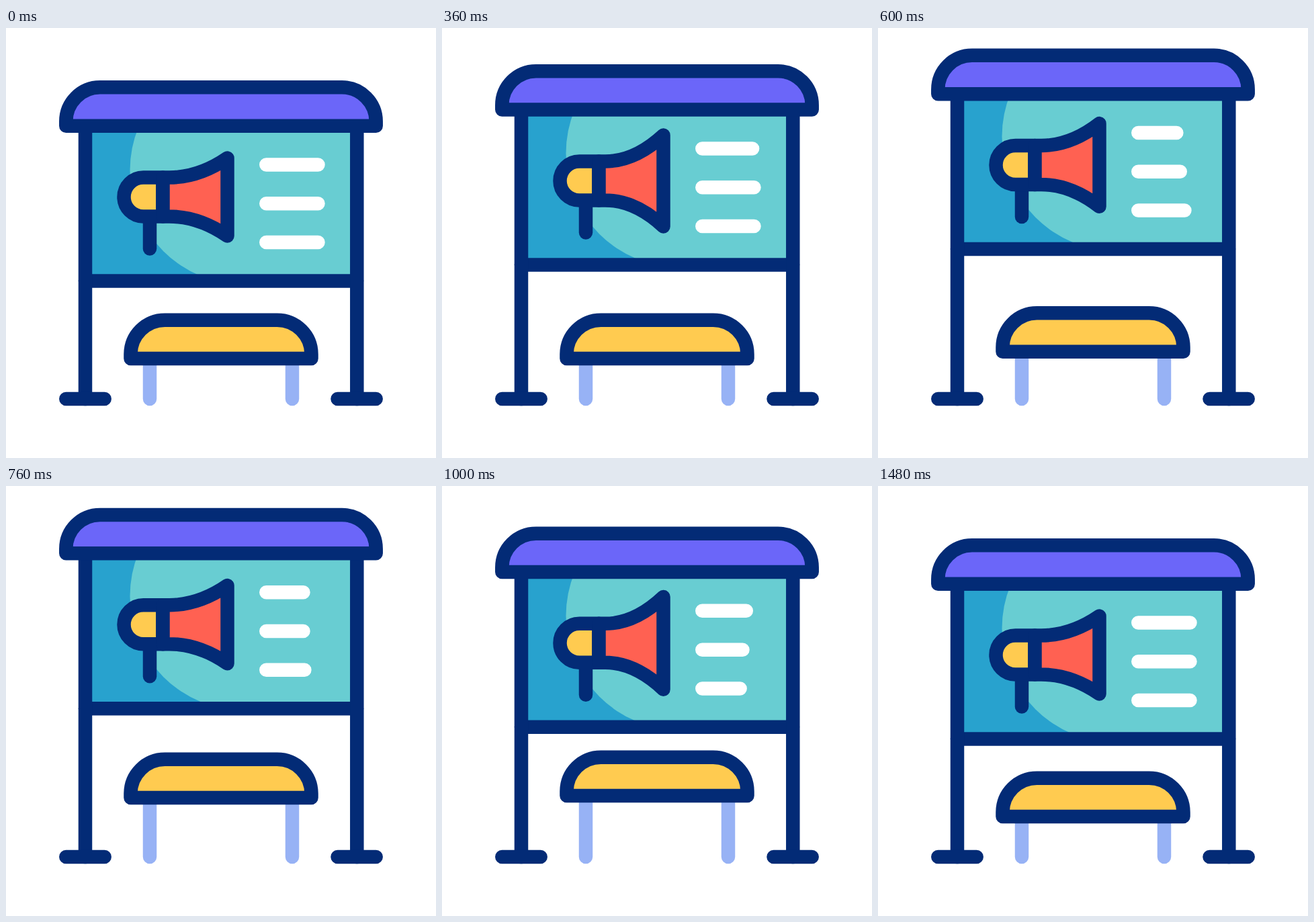
Write an HTML page that moves like this. It is 640 px wide and 640 px high and loops after 1640 ms.

```html
<!DOCTYPE html>
<html lang="en">
<head>
<meta charset="utf-8">
<title>Bus stop billboard</title>
<style>
  html, body { margin: 0; width: 100%; height: 100%; overflow: hidden; background: #fff; }
  body > svg { display: block; width: 100%; height: 100%; }
  .line { stroke: #032b76; stroke-width: 20.5; stroke-linecap: round; stroke-linejoin: round; }
</style>
</head>
<body>
<svg viewBox="0 0 640 640">
  <g class="line" fill="none">
    <path id="legs" style="stroke: #97b2f5"/>
    <path id="bench" fill="#ffcb50" d="M185.5 492V485.5A51 51 0 0 1 236.5 434.7H403.5A51 51 0 0 1 454.5 485.5V492Z"/>
    <g id="shelter">
      <svg x="118" y="146" width="404" height="230" viewBox="118 146 404 230" stroke="none">
        <path fill="#28a2ce" d="M118 146H522V376H118Z"/>
        <path id="glow" fill="#68cdd2" d="M600 42H354.5A170 170 0 0 0 354.5 382H600Z"/>
      </svg>
      <path d="M118 376.5H522"/>
      <path d="M214 281V328.5"/>
      <path fill="#ffcb50" d="M233.5 222.5H204.5A29 29 0 0 0 204.5 280.5H233.5Z"/>
      <path id="bell" fill="#ff6152"/>
      <path id="bars" style="stroke: #fff"/>
    </g>
    <path id="posts"/>
    <path id="roof" fill="#6b66f9" d="M89.3 145.7V139A50.7 50.7 0 0 1 140 88.3H500A50.7 50.7 0 0 1 550.7 139V145.7Z"/>
    <path d="M89.3 552H146.7M493.5 552H550.7"/>
  </g>
</svg>
<script>
const LOOP = 1640, STEP = 40;
const el = id => document.getElementById(id);
const shape = (id, d) => el(id).setAttribute("d", d);
const shift = (id, y) => el(id).setAttribute("transform", `translate(0 ${y})`);

const ease = (t, from, to) => {
  const x = Math.min(1, Math.max(0, (t - from) / (to - from)));
  return x * x * (3 - 2 * x);
};
// Rises from a to b, holds, then falls from c to d
const pulse = (t, a, b, c, d) => ease(t, a, b) - ease(t, c, d);

function draw(t) {
  const lift = -48.2 * pulse(t, 80, 640, 680, 1222);
  const hop = -32 * pulse(t, 446, 851, 945, 1480);
  const flare = 11 * (pulse(t, 100, 420, 420, 720) + pulse(t, 740, 1020, 1020, 1290));

  shift("shelter", lift);
  shift("roof", lift);
  shift("glow", lift * 0.06);
  shift("bench", hop);
  shape("posts", `M118 ${146 + lift}V552M522.3 ${146 + lift}V552`);
  shape("legs", `M214 ${492 + hop}V552M426 ${492 + hop}V552`);

  const top = 193.5 - flare, bottom = 309.5 + flare, bend = flare * 0.4;
  shape("bell", `M233.5 222.5H243C275 222.5 304 ${211 - bend} 329.5 ${top}V${bottom}` +
    `C304 ${292 + bend} 275 280.5 243 280.5H233.5Z`);

  shape("bars", [0, 1, 2].map(i => {
    const shrink = 22 * pulse(t - i * 80, 280, 670, 775, 1245);
    return `M387.3 ${203.5 + i * 57.8}H${464.5 - shrink}`;
  }).join(""));
}

const start = performance.now();
function tick() {
  const t = (performance.now() - start) % LOOP;
  draw(Math.floor(t / STEP) * STEP);
  requestAnimationFrame(tick);
}
tick();
</script>
</body>
</html>
```
